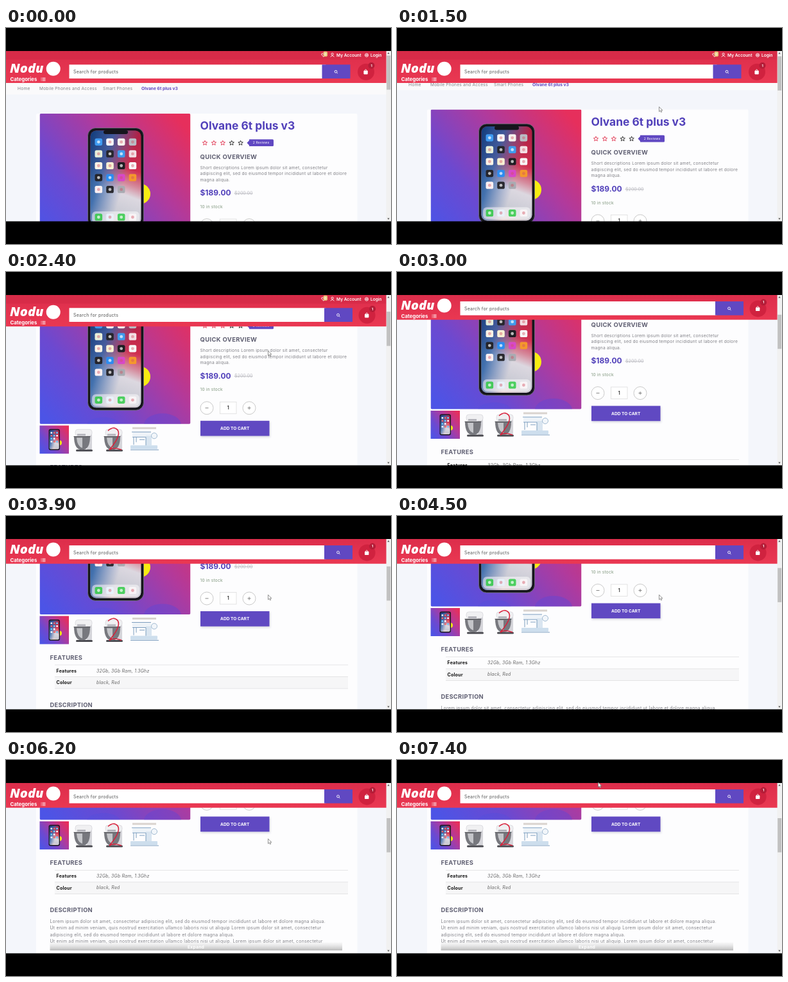
Write an HTML page that moves like this. It is 600 by 338 pixels and loops after 9.4 s.

```html
<!DOCTYPE html>
<html lang="en">
<head>
<meta charset="utf-8">
<title>Shop page scroll</title>
<style>
html, body { margin: 0; width: 100%; height: 100%; overflow: hidden; background: #000; }
svg { display: block; width: 600px; height: 338px; }
text { font-family: Inter, "Open Sans", sans-serif; letter-spacing: .033em; white-space: pre; }
.b { font-weight: 700; }
.m { font-weight: 600; }
.i { font-style: italic; }
.tight { letter-spacing: 0; }
.logo { font: italic 800 20px "Open Sans", sans-serif; letter-spacing: 0; }
.mid { text-anchor: middle; }
.line { fill: none; stroke-width: .9; }
</style>
</head>
<body>
<svg id="stage" viewBox="0 0 600 338">
  <defs>
    <linearGradient id="photo" x1="0" y1=".9" x2="1" y2=".15">
      <stop offset="0" stop-color="#4c54e6"/><stop offset=".3" stop-color="#6c49d0"/>
      <stop offset=".65" stop-color="#b13a9c"/><stop offset="1" stop-color="#e62f5c"/>
    </linearGradient>
    <linearGradient id="screen" x1=".6" y1="0" x2=".4" y2="1">
      <stop offset="0" stop-color="#b01f45"/><stop offset=".35" stop-color="#cf3050"/>
      <stop offset=".52" stop-color="#d58a9c"/><stop offset=".64" stop-color="#dcd8e0"/>
      <stop offset=".85" stop-color="#c9cad4"/><stop offset="1" stop-color="#e6d3d3"/>
    </linearGradient>
    <linearGradient id="blue" x1="0" y1=".1" x2=".7" y2=".5">
      <stop offset="0" stop-color="#16407f"/><stop offset=".45" stop-color="#2c62a8" stop-opacity=".85"/>
      <stop offset="1" stop-color="#5a78b8" stop-opacity="0"/>
    </linearGradient>
    <linearGradient id="red" x1="0" y1="0" x2="0" y2="1">
      <stop offset="0" stop-color="#dc2d4b"/><stop offset="1" stop-color="#ea3852"/>
    </linearGradient>
    <linearGradient id="fade" x1="0" y1="0" x2="0" y2="1">
      <stop offset="0" stop-color="#eee" stop-opacity=".4"/><stop offset="1" stop-color="#b9b9b9"/>
    </linearGradient>
    <filter id="soft" x="-10%" y="-10%" width="120%" height="130%">
      <feDropShadow dx="1" dy="2" stdDeviation="1.5" flood-color="#446" flood-opacity=".2"/>
    </filter>
    <clipPath id="photoClip"><rect x="52.5" y="134" width="235" height="199.5" rx="2"/></clipPath>
  </defs>
  <rect y="35" width="600" height="268" fill="#f4f6fb"/>
  <g id="page"></g>
  <g id="header"></g>
  <g id="scrollbar"></g>
  <path d="M0 0H600V36H0zM0 302.4H600V338H0z"/>
  <path id="cursor" d="M0 0V7.6L1.8 6L3 8.6L4.2 8L3.1 5.5H5.4z" fill="#fff" stroke="#666" stroke-width=".7"/>
</svg>
<script>
const $ = id => document.getElementById(id);
const PURPLE = '#6048c2', SLATE = '#5f5f72', GREY = '#808086';
const NAME = 'Olvane 6t plus v3';

// y is the middle of the capitals
const text = (x, y, size, fill, str, cls = '') =>
  `<text x="${x}" y="${y}" dy=".36em" font-size="${size}" fill="${fill}" class="${cls}">${str}</text>`;
const rect = (x, y, w, h, fill, extra = '') =>
  `<rect x="${x}" y="${y}" width="${w}" height="${h}" fill="${fill}" ${extra}/>`;
const circle = (x, y, r, fill, extra = '') =>
  `<circle cx="${x}" cy="${y}" r="${r}" fill="${fill}" ${extra}/>`;
const line = (d, stroke, extra = '') => `<path class="line" d="${d}" stroke="${stroke}" ${extra}/>`;

function star(x, y, color) {
  let d = '';
  for (let k = 0; k < 10; k++) {
    const r = k % 2 ? 1.7 : 3.9, a = k * Math.PI / 5;
    d += `${k ? 'L' : 'M'}${(x + r * Math.sin(a)).toFixed(2)} ${(y - r * Math.cos(a)).toFixed(2)}`;
  }
  return line(d + 'z', color);
}

const screen = (x, y, w, h, r) =>
  rect(x, y, w, h, 'url(#screen)', `rx="${r}"`) + rect(x, y, w, h, 'url(#blue)', `rx="${r}"`);

function phone() {
  const rows = [
    ['#3f9bf2', '#fafafa', '#f7f2ee', '#b9bcc4'],
    ['#e6efda', '#26262c', '#3f9cee', '#f3dfe4'],
    ['#fbf3e6', '#f8f1d4', '#1d1d22', '#f8f8f8'],
    ['#24242a', '#2d8cf0', '#d848c8', '#f5982c'],
    ['#fbf0f2', '#2a2a30', '#a9abb2'],
    [], ['#45c95a', '#e8f1fa', '#4ccf5f', '#f8f4f6']
  ];
  const icons = rows.map((row, r) => row.map((c, k) => {
    const x = 144.3 + k * 17.7, y = r === 6 ? 296 : 178.3 + r * 18.6;
    return rect(x - 5.8, y - 5.6, 11.6, 11.2, c, 'rx="2.6"') +
      circle(x, y, 2.4, c < '#8' ? '#ffffffb0' : '#d0506070');
  }).join('')).join('');
  return rect(127.5, 156.5, 87, 155.5, '#15151c', 'rx="12" stroke="#77777f" stroke-width=".8"') +
    screen(131.5, 160.5, 79, 147.5, 9) +
    rect(152, 160, 38, 6, '#15151c', 'rx="3"') +
    rect(134, 287, 74, 18.5, '#fff', 'rx="6" opacity=".5"') + icons;
}

function mixer(x) {
  return `<g transform="translate(${x} 336)">` +
    rect(27, 11, 8, 27, '#d5d5da', 'rx="2"') + rect(9, 6, 26, 10, '#f0f0f2', 'rx="4" stroke="#cfcfd4" stroke-width=".6"') +
    rect(12, 13, 13, 3, '#b5b5bc') + rect(10, 37.5, 26, 3, '#4a4a50', 'rx="1.5"') +
    '<path d="M7 17H32Q32 38 19.5 38T7 17z" fill="#77787e"/><path d="M11 19H20V35Q12 33 11 19z" fill="#c4c5c9"/>' +
    line('M6.5 17.3H32.5', '#3f3f45') + '</g>';
}

function thumbs() {
  return rect(52.5, 336, 45.5, 44, 'url(#photo)') + circle(83, 363, 4, '#f5e916') +
    rect(66.5, 341.5, 17.5, 33, '#17171e', 'rx="3"') + screen(67.8, 343, 14.9, 30, 2) +
    [0, 1, 2, 3].map(r => [0, 1, 2].map(k =>
      rect(69.5 + k * 4.4, 346 + r * 4.6, 2.6, 2.6, ['#fff', '#e66', '#6cf'][(r + k) % 3])).join('')).join('') +
    mixer(99) + mixer(146) +
    line('M159 344Q168 336 174 343Q180 352 161 374Q168 369 180 374', '#d8203a', 'style="stroke-width:1.6"') +
    rect(197, 338.5, 37, 3, '#d9d3cf') +
    rect(197, 346, 29, 8, '#eef3f8', 'rx="2"') + rect(218, 352, 9, 15, '#d9e5f0') +
    rect(194, 367, 42, 6, '#cddeed', 'rx="1"') + circle(231, 352, 4.5, '#f2f6fa', 'stroke="#8aa9c6" stroke-width=".8"') +
    line('M199 354V366M203 354V362M196 346H226M197 354H218V367M194 374H238M208 358H216', '#6f93b8');
}

function buildPage() {
  const dark = '#111';
  const desc = [
    'Lorem ipsum dolor sit amet, consectetur adipiscing elit, sed do eiusmod tempor incididunt ut labore et dolore magna aliqua.',
    'Ut enim ad minim veniam, quis nostrud exercitation ullamco laboris nisi ut aliquip Lorem ipsum dolor sit amet, consectetur',
    'adipiscing elit, sed do eiusmod tempor incididunt ut labore et dolore magna aliqua.',
    'Ut enim ad minim veniam, quis nostrud exercitation ullamco laboris nisi ut aliquip. Lorem ipsum dolor sit amet, consectetur'
  ];
  const overview = [
    'Short descriptions Lorem ipsum dolor sit amet, consectetur',
    'adipiscing elit, sed do eiusmod tempor incididunt ut labore et dolore',
    'magna aliqua.'
  ];
  $('page').innerHTML =
    rect(0, 80, 593, 24, '#fafafb') +
    text(18, 95, 6.7, GREY, 'Home') + text(52, 95, 6.6, GREY, 'Mobile Phones and Access') +
    text(151, 95, 6.6, GREY, 'Smart Phones') + text(211, 95, 6.7, PURPLE, NAME, 'b tight') +
    rect(47, 134, 500.5, 480, '#fdfdfe', 'rx="2"') +
    `<g clip-path="url(#photoClip)">${rect(52.5, 134, 235, 200, 'url(#photo)')}` +
    '<ellipse cx="152" cy="336" rx="26" ry="13" fill="#4a4fe0" opacity=".25"/>' +
    '<ellipse cx="244" cy="335" rx="29" ry="18" fill="#5a48d8" opacity=".4"/>' +
    circle(209, 259.5, 16, '#f7ec12') + phone() + '</g>' + thumbs() +
    text(302.5, 153, 17.4, '#5140ba', NAME, 'b tight') +
    [0, 1, 2, 3, 4].map(k => star(310 + k * 13.9, 180, k < 3 ? '#e0334f' : '#222')).join('') +
    `<path d="M375.5 179.7L379 176V174.3H415.5Q417 174.3 417 176V183.5Q417 185 415.5 185H379V183.4z" fill="${PURPLE}"/>` +
    text(397.5, 179.5, 5, '#fff', '2 Reviews', 'mid') +
    text(302.5, 201.3, 9.5, SLATE, 'QUICK OVERVIEW', 'b') +
    overview.map((s, k) => text(302.5, 218.2 + k * 9.7, 6.66, GREY, s)).join('') +
    text(302.5, 258, 12, '#5140ba', '$189.00', 'b tight') +
    text(356, 258.5, 7.1, '#c2c2c8', '$200.00', 'tight') + line('M355.5 258.8H384.5', '#b4b4ba') +
    text(302.5, 279.7, 6.6, '#7f967c', '10 in stock') +
    [313, 379].map(x => circle(x, 308.5, 10, '#fff', 'stroke="#bbb" stroke-width=".8"') +
      line(`M${x - 2.5} 308.5h5`, '#777')).join('') + line('M379 306v5', '#777') +
    rect(333.5, 299, 25.5, 18.5, '#fff', 'stroke="#ddd" stroke-width=".8"') +
    text(346.3, 308.3, 7, '#222', '1', 'm mid') +
    rect(303, 328.5, 107.5, 23.7, PURPLE, 'filter="url(#soft)"') +
    text(356.7, 340.5, 6.6, '#fff', 'ADD TO CART', 'b mid tight') +
    text(68.5, 401, 9.3, SLATE, 'FEATURES', 'b') +
    rect(76, 431, 457, 18.5, '#f6f6f7') +
    line('M76 412.5H533M76 431H533M76 449.5H533', '#e2e2e4') +
    text(78.5, 421.7, 7, dark, 'Features', 'b') + text(141, 421.7, 6.9, '#666', '32Gb, 3Gb Ram, 1.3Ghz', 'i') +
    text(78.5, 440, 7, dark, 'Colour', 'b') + text(141, 440, 6.9, '#666', 'black, Red', 'i') +
    text(68.5, 475, 9.3, SLATE, 'DESCRIPTION', 'b') +
    desc.map((s, k) => text(68.5, 492.6 + k * 10.4, 6.9, GREY, s)).join('') +
    rect(68.5, 525.5, 455.5, 12.5, 'url(#fade)') +
    text(296, 532.3, 6.8, '#fff', 'Expand', 'b mid');
}

function buildHeader() {
  const search = (x, y) => circle(x, y, 1.9, 'none', 'stroke="#fff" stroke-width=".9"') +
    line(`M${x + 1.4} ${y + 1.4}l1.6 1.6`, '#fff');
  $('header').innerHTML =
    rect(0, 35, 593, 51, 'url(#red)', 'id="band"') +
    `<g id="topbar">${rect(0, 35, 593, 14.5, '#d42a47', 'opacity=".7"')}` +
    line('M495 45.2L491.8 42Q491.3 39.8 493.3 39.8L495 41.2L496.7 39.8Q498.7 39.8 498.2 42z', '#fff') +
    rect(494.5, 36.7, 6.5, 8, '#e8c77a', 'rx="2"') + text(497.8, 40.7, 5, '#fff', '0', 'b mid tight') +
    circle(508.6, 40.8, 1.6, 'none', 'stroke="#fff" stroke-width=".9"') + line('M505.8 45.3Q508.6 41.3 511.4 45.3', '#fff') +
    text(515, 42.5, 6.6, '#fff', 'My Account', 'm tight') +
    circle(562, 42.5, 2.6, 'none', 'stroke="#fff" stroke-width=".9"') + line('M560 42.5h3.2M562 41.2l1.3 1.3l-1.3 1.3', '#fff') +
    text(568, 42.5, 6.6, '#fff', 'Login', 'm tight') + '</g>' +
    '<g id="main"><text class="logo" x="6" y="70.2" fill="#fff">Nodu</text>' +
    circle(73.7, 63.8, 11, '#fff') +
    text(6.5, 80.3, 7.8, '#fff', 'Categories', 'b tight') +
    line('M54.5 78.3h1M56.5 78.3h5M54.5 80.3h1M56.5 80.3h5M54.5 82.3h1M56.5 82.3h5', '#fff') +
    rect(98.5, 57.3, 400, 21.7, '#fff') + text(105, 68.4, 7, '#555', 'Search for products') +
    `<g id="find">${rect(492.5, 57.3, 44, 21.7, PURPLE)}${search(514, 68.2)}</g>` +
    `<g id="bag">${circle(561, 68.7, 13, '#d0223f')}` +
    rect(557.4, 66.8, 6.4, 5.6, '#fff', 'rx=".8"') + line('M559 67.5V66.2Q560.6 63.6 562.2 66.2V67.5', '#fff') +
    circle(569.5, 58.8, 5, '#b51d38') + text(569.5, 58.8, 5.2, '#fff', '1', 'b mid tight') + '</g></g>';
}

function buildScrollbar() {
  $('scrollbar').innerHTML = rect(592.6, 35, 7.4, 268, '#f1f1f1') +
    rect(593.2, 43, 6, 53.5, '#c1c1c1', 'id="thumb"') +
    '<path d="M594.3 40.5L596 38L597.7 40.5zM594.3 297.5L596 300L597.7 297.5z" fill="#555"/>';
}

// [time, offset] points; each wheel click moves the page by 48 px
const SCROLL = [[1400, 0], [1500, 6.5], [1900, 48], [2400, 95.7], [2700, 101], [3000, 119],
  [3300, 143], [3600, 149], [3900, 179.5], [4200, 192], [5300, 192], [5500, 211], [5700, 233], [6000, 240]];

function scrollAt(t) {
  const n = SCROLL.findIndex(p => p[0] >= t);
  if (n < 0) return 240;
  if (!n) return 0;
  const [t0, a] = SCROLL[n - 1], [t1, b] = SCROLL[n];
  return a + (b - a) * (t - t0) / (t1 - t0);
}

const shift = (id, x, y) => $(id).setAttribute('transform', `translate(${x.toFixed(2)} ${y.toFixed(2)})`);
const show = (id, on) => $(id).setAttribute('visibility', on ? 'visible' : 'hidden');

function draw(t) {
  const s = scrollAt(t), moved = s > 20, sticky = s > 100;
  shift('page', 0, -s);
  shift('thumb', 0, s * .2);
  shift('main', 0, sticky ? -11.3 : moved ? -1 : 0);
  shift('find', moved ? 3.5 : 0, 0);
  shift('bag', moved ? 1.6 : 0, 0);
  show('topbar', !sticky);
  $('band').setAttribute('height', sticky ? 39.7 : moved ? 50.2 : 51);

  const k = Math.min(1, Math.max(0, (t - 6500) / 700)), e = k * k * (3 - 2 * k);
  shift('cursor', 408.5 - 95 * e, 123.3 - 88.3 * e);
  show('cursor', t >= 1500 && (t < 2500 || t >= 3500));
}

buildPage();
buildHeader();
buildScrollbar();
const start = performance.now();
function tick() {
  const t = (performance.now() - start) % 9400;
  draw(Math.floor(t / 100) * 100);
  requestAnimationFrame(tick);
}
tick();
</script>
</body>
</html>
```
